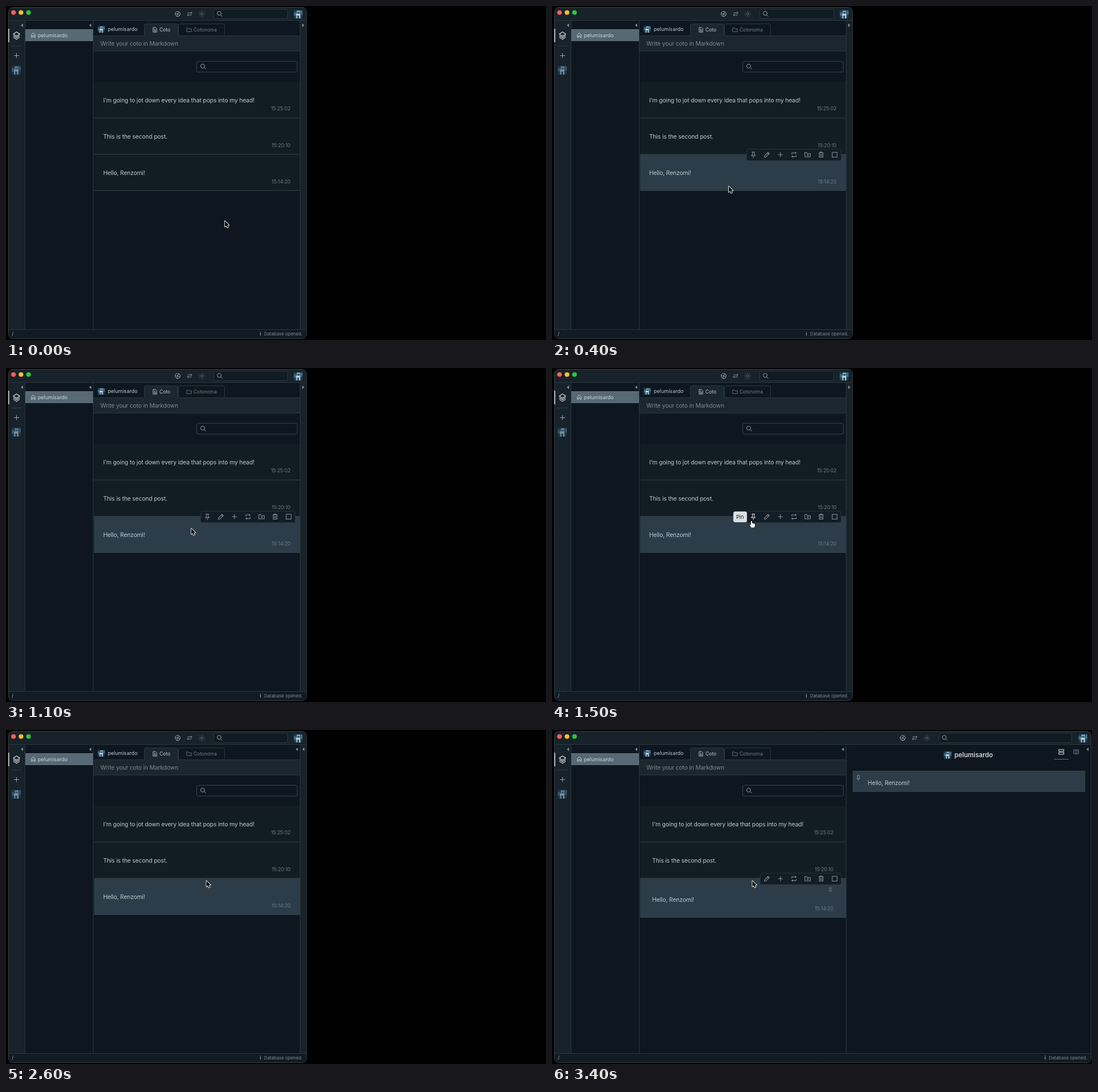
An HTML page with a canvas for the animation above (3.7 s loop, 950 px wide and 589 px high).

```html
<!DOCTYPE html>
<html lang="en">
<head>
<meta charset="utf-8">
<title>Pinning a post</title>
<style>
  html, body { margin: 0; height: 100%; overflow: hidden; background: #000; }
  canvas { display: block; }
</style>
</head>
<body>
<canvas id="stage" width="950" height="589"></canvas>
<script>
const ctx = document.getElementById('stage').getContext('2d');
const LOOP = 3700, STEP = 100;
const USER = 'pelumisardo', GREETING = 'Hello, Renzomi!';

const color = {
  base: '#0e171f', bar: '#17222a', row: '#121d23', hover: '#2c3d49', input: '#1a272f',
  line: '#2a3740', field: '#35434d', text: '#bfc8ce', dim: '#717c84', faint: '#56626a', icon: '#9ba6ad'
};

// Icon outlines on a 24 x 24 grid
const icons = {
  search: 'M17 10a7 7 0 1 1-14 0a7 7 0 1 1 14 0M15 15l6 6',
  globe: 'M21 12a9 9 0 1 1-18 0a9 9 0 1 1 18 0M4 9l6 6v6M17 4l-2 5h-4v4h5l2 5',
  swap: 'M4 8h17M17 4l4 4-4 4M20 16H3M7 12l-4 4 4 4',
  sun: 'M16 12a4 4 0 1 1-8 0a4 4 0 1 1 8 0M12 1v3M12 20v3M1 12h3M20 12h3M4 4l2 2M18 18l2 2M20 4l-2 2M4 20l2-2',
  layers: 'M12 2l9 6-9 6-9-6zM3 12.5l9 6 9-6M3 17l9 6 9-6',
  plus: 'M12 4v16M4 12h16',
  home: 'M5 10l7-6 7 6v10h-4v-6H9v6H5z',
  note: 'M5 3h9l5 5v13H5zM8 9h4M8 13h8M8 17h8',
  folder: 'M3 5h6l2 3h10v11H3z',
  pin: 'M7 3h10M9 3v8l-3 4h12l-3-4V3M12 15v7',
  edit: 'M4 20v-4L16 4l4 4L8 20zM13.5 6.5l4 4',
  repeat: 'M5 11V6h14M16 3l3 3-3 3M19 13v5H5M8 15l-3 3 3 3',
  folderPlus: 'M3 5h6l2 3h10v11H3zM13 10.5v6M10 13.5h6',
  trash: 'M6 6v14h12V6M4 6h16M9 6V3h6v3M10 10v7M14 10v7',
  square: 'M4 4h16v16H4z',
  rows: 'M4 4h16v6H4zM4 14h16v6H4z',
  columns: 'M3 5h18v14H3zM9 5v14M15 5v14'
};
for (const name in icons) icons[name] = new Path2D(icons[name]);

const arrowShape = new Path2D('M0 0V10.2L2.4 8.1 4.1 11.8 5.9 11 4.3 7.4H7.4Z');
const handShape = new Path2D('M-1 0.6Q0 -1 1 .6V4Q2 3 2.8 4.3Q4 3.6 4.5 4.8Q6 4.5 6 6V8.3L4.8 11.5H-.4L-3 7.5Q-3.2 5.8-1 7Z');

// Pointer path: time, x, y
const path = [
  [0, 385, 379], [100, 380, 374], [300, 334, 338], [400, 311, 318], [500, 300, 309], [600, 295, 304],
  [700, 296, 303], [1100, 326, 283], [1300, 340, 275], [1500, 351, 270], [1700, 352.5, 266], [LOOP, 352.5, 266]
];

function pointerAt(t) {
  const i = path.findIndex(p => p[0] > t);
  const [t0, x0, y0] = path[i - 1], [t1, x1, y1] = path[i];
  const k = (t - t0) / (t1 - t0);
  return [x0 + (x1 - x0) * k, y0 + (y1 - y0) * k];
}

function rect(x, y, w, h, fill) {
  ctx.fillStyle = fill;
  ctx.fillRect(x, y, w, h);
}

function box(x, y, w, h, fill, stroke, radius = 2.5) {
  ctx.beginPath();
  ctx.roundRect(x + .5, y + .5, w - 1, h - 1, radius);
  ctx.fillStyle = fill;
  ctx.fill();
  ctx.lineWidth = 1;
  ctx.strokeStyle = stroke;
  ctx.stroke();
}

function text(str, x, y, size, fill = color.text, { weight = 400, align = 'left', spacing = 0 } = {}) {
  ctx.font = `${weight} ${size}px Inter, sans-serif`;
  ctx.letterSpacing = spacing + 'px';
  ctx.textAlign = align;
  ctx.fillStyle = fill;
  ctx.fillText(str, x, y + size * .36);
}

const body = (str, x, y, fill) => text(str, x, y, 10.27, fill, { spacing: -.11 });

function icon(name, cx, cy, size, stroke = color.icon, weight = 1.9) {
  ctx.save();
  ctx.translate(cx - size / 2, cy - size / 2);
  ctx.scale(size / 24, size / 24);
  ctx.lineWidth = weight;
  ctx.strokeStyle = stroke;
  ctx.stroke(icons[name]);
  ctx.restore();
}

function triangle(x, y, dir) {
  ctx.beginPath();
  ctx.moveTo(x - 2 * dir, y - 3.2);
  ctx.lineTo(x + 2 * dir, y);
  ctx.lineTo(x - 2 * dir, y + 3.2);
  ctx.fillStyle = '#7b868d';
  ctx.fill();
}

function avatar(cx, cy, size, alpha = 1) {
  ctx.save();
  ctx.globalAlpha = alpha;
  ctx.translate(cx - size / 2, cy - size / 2);
  ctx.scale(size / 12, size / 12);
  rect(0, 0, 12, 12, '#203c50');
  rect(0, 3, 3, 5, '#3c6a86');
  rect(4, 1, 5, 4, '#82adc3');
  rect(3, 5, 6, 3, '#b5d0db');
  rect(3, 8, 2, 4, '#8fb3c4');
  rect(7, 8, 2, 4, '#a9c6d2');
  rect(5, 3, 3, 2, '#283d4c');
  rect(10, 1, 2, 6, '#477994');
  ctx.restore();
}

function drawChrome(open) {
  const right = open ? 949 : 529, shift = open ? 420 : 0, mid = open ? 315 : 0;
  box(4, 2, right - 4, 585, color.base, '#37434a', 7);
  ctx.save();
  ctx.beginPath();
  ctx.roundRect(5, 3, right - 6, 583, 6);
  ctx.clip();
  rect(5, 3, right - 6, 22, color.bar);
  rect(5, 25, right - 6, 1, color.line);
  rect(5, 26, 28, 544, color.bar);
  if (!open) rect(518, 26, 10, 544, color.bar);
  rect(5, 570, right - 6, 17, '#111b23');
  rect(5, 570, right - 6, 1, color.line);
  for (const x of [33, 153, 517]) rect(x, 26, 1, 544, color.line);
  ctx.restore();

  ['#ff5f57', '#febc2e', '#28c840'].forEach((fill, i) => {
    ctx.beginPath();
    ctx.arc(13.2 + i * 13.2, 11.5, 4.1, 0, 7);
    ctx.fillStyle = fill;
    ctx.fill();
  });
  icon('globe', 302 + mid, 14, 12);
  icon('swap', 323 + mid, 14, 11);
  icon('sun', 344.5 + mid, 14, 12, color.dim);
  box(365 + mid, 5, open ? 235 : 131, 18, '#111b22', color.line);
  icon('search', 376 + mid, 14, 12);
  avatar(514 + shift, 14.5, 15);
  text('/', 10, 578, 9, color.icon);
  text('i', 446.5 + shift, 578, 8.5, color.icon, { weight: 600 });
  text('Database opened.', 454 + shift, 578, 7.85, '#7f8a91');
}

function drawSidebar() {
  rect(4, 40, 1.5, 24, '#e6eaed');
  triangle(28, 34, -1);
  triangle(148, 34, -1);
  icon('layers', 18.5, 52, 15, '#dce3e7');
  rect(9, 70, 19, 1, '#303e47');
  icon('plus', 18.5, 87.5, 13);
  avatar(18, 113, 16, .6);
  rect(34, 41, 119, 21, '#566974');
  rect(34, 41, 119, 1, '#647781');
  icon('home', 48, 51.5, 11.5, '#cbd3d8');
  text(USER, 56, 51.5, 9.03, '#d0d7db');
}

function drawComposer() {
  avatar(167.5, 41, 12);
  text(USER, 179, 41, 9.03);
  rect(155, 52, 362, 1, color.line);
  box(303, 31, 82, 22, color.base, color.line);
  box(243, 31, 60, 25, color.input, color.line);
  rect(154, 53, 363, 26, color.input);
  rect(154, 79, 363, 1, color.line);
  icon('note', 262, 42, 11, color.text);
  text('Coto', 270, 42, 8.5);
  icon('folder', 322, 42, 11, color.dim);
  text('Cotonoma', 330, 42, 8.4, color.dim);
  body('Write your coto in Markdown', 166, 66, '#7d888f');
  box(335, 97, 178, 20, color.base, color.field);
  icon('search', 347, 107, 12);
}

function drawPosts(open, hover) {
  const inset = open ? 5.3 : 0;
  const posts = [
    ["I'm going to jot down every idea that pops into my head!", '15:25:02'],
    ['This is the second post.', '15:20:10'],
    [GREETING, '15:14:20']
  ];
  posts.forEach(([message, time], i) => {
    const top = 133.5 + i * 64.2, last = i === 2, drop = last && open ? 4.8 : 0;
    const y = Math.round(top), bottom = Math.round(top + 64 + drop);
    rect(155, y, 362, bottom - y, last && hover ? color.hover : color.row);
    rect(155, bottom - 1, 362, 1, last && hover ? '#32444f' : '#2f3b43');
    body(message, 171 + inset, top + 32.5 + drop);
    text(time, 500.5 - inset, top + 47.8 + drop, 8.55, '#707b82', { align: 'right' });
  });
  if (open) icon('pin', 490, 282, 10.5, color.dim);
}

function drawToolbar(open, onPin) {
  const left = open ? 366 : 342;
  box(left, 252, 509 - left, 21, '#131d25', '#24313a');
  ['pin', 'edit', 'plus', 'repeat', 'folderPlus', 'trash', 'square'].forEach((name, i) => {
    if (open && name === 'pin') return;
    const lit = onPin && name === 'pin';
    icon(name, 354.2 + i * 23.85, 262.3, 12.8, lit ? '#e0e6e9' : '#89959c');
  });
  if (onPin) {
    box(319, 253, 24, 19, '#d9dfe3', '#d9dfe3');
    text('Pin', 324, 262.5, 9.2, '#1a252d');
  }
}

function drawPinnedPane() {
  avatar(696, 44, 13);
  text(USER, 708, 43.5, 11.3, '#d0d7dc', { weight: 600 });
  icon('rows', 896, 38.5, 13, '#d3dade');
  rect(883, 51, 26, 1, '#64717a');
  icon('columns', 922, 38.5, 12, color.dim);
  triangle(942, 34, -1);
  rect(529, 72, 409, 37, color.hover);
  rect(529, 72, 409, 1, '#354752');
  rect(529, 108, 409, 1, '#354752');
  icon('pin', 539, 84.5, 12, '#84919a');
  body(GREETING, 555.5, 93.5);
}

function drawPointer(t) {
  const hand = t >= 1400 && t < 2500;
  const shape = hand ? handShape : arrowShape;
  ctx.save();
  ctx.translate(...pointerAt(t));
  ctx.lineJoin = 'round';
  ctx.lineWidth = hand ? .9 : 1.7;
  ctx.strokeStyle = hand ? '#000' : '#fff';
  ctx.stroke(shape);
  ctx.fillStyle = hand ? '#fff' : '#000';
  ctx.fill(shape);
  ctx.restore();
}

function draw(now) {
  const t = Math.floor(now % LOOP / STEP) * STEP;
  const hover = t >= 400, paneOpening = t >= 2500, open = t >= 2700;
  rect(0, 0, 950, 589, '#000');
  drawChrome(open);
  drawSidebar();
  drawComposer();
  drawPosts(open, hover);
  if (paneOpening) triangle(511.5, 34, -1);
  if (open) drawPinnedPane();
  else triangle(523, 34, paneOpening ? -1 : 1);
  if (hover && (!paneOpening || open)) drawToolbar(open, t >= 1400 && !open);
  drawPointer(t);
  requestAnimationFrame(draw);
}
requestAnimationFrame(draw);
</script>
</body>
</html>
```
